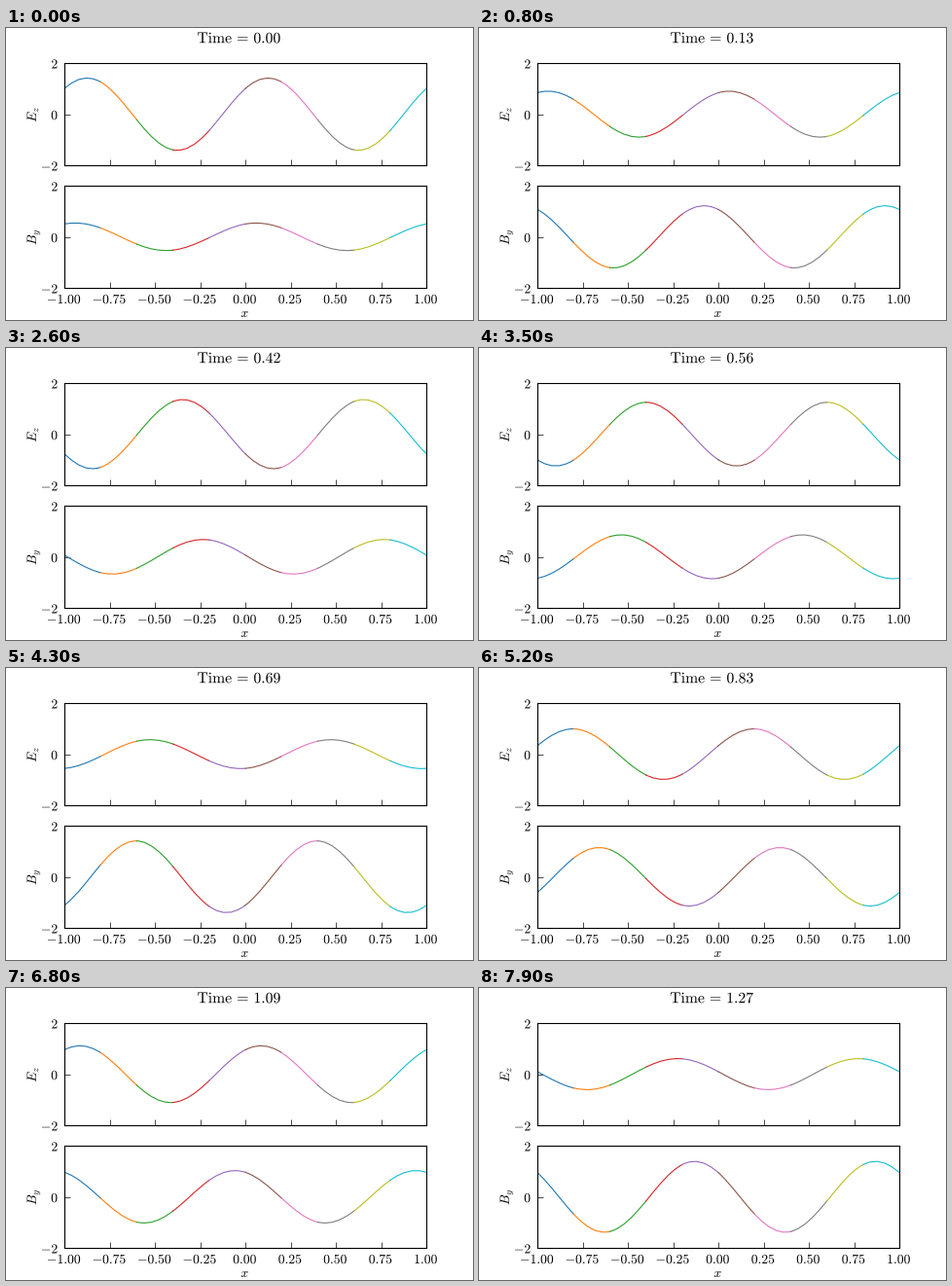
A matplotlib script that plays this animation: 480 px wide and 300 px high, repeating every 8 s.

```python
import numpy as np
import matplotlib.pyplot as plt
from matplotlib import patheffects
from matplotlib.animation import FuncAnimation
from matplotlib.text import Text

plt.rcParams.update({
    "mathtext.fontset": "cm",
    "font.size": 9.8,
    "axes.linewidth": 0.8,
    "lines.linewidth": 0.8,
    "xtick.direction": "in",
    "ytick.direction": "in",
    "xtick.major.size": 4,
    "ytick.major.size": 4,
    "xtick.major.width": 0.5,
    "ytick.major.width": 0.5,
    "xtick.major.pad": 3.6,
    "ytick.major.pad": 4,
})

W, H, DPI = 480, 300, 100
FRAMES, INTERVAL = 80, 100
DT = 0.01603
CELLS, ORDER = 10, 7

# Gauss-Lobatto nodes inside each cell
inner = np.polynomial.legendre.Legendre.basis(ORDER).deriv().roots()
nodes = np.concatenate(([-1], np.sort(inner.real), [1]))
edges = np.linspace(-1, 1, CELLS + 1)
cells = [(a + b) / 2 + (b - a) / 2 * nodes for a, b in zip(edges, edges[1:])]

# Complex amplitudes of the standing mode exp(2*pi*i*x)
E0 = 1 - 1j
B0 = 0.5 - 0.2j


def fields(t):
    c, s = np.cos(2 * np.pi * t), np.sin(2 * np.pi * t)
    return E0 * c + 1j * B0 * s, B0 * c + 1j * E0 * s


def wave(amp, x):
    return (amp * np.exp(2j * np.pi * x)).real


fig, axes = plt.subplots(2, 1, sharex=True, figsize=(W / DPI, H / DPI), dpi=DPI)
fig.subplots_adjust(left=0.125, right=0.9, bottom=0.11, top=0.88, hspace=0.2)
title = fig.suptitle("", fontsize=11.3, y=0.989)

xticks = np.linspace(-1, 1, 9)
for ax, name in zip(axes, ("E_z", "B_y")):
    ax.set_xlim(-1, 1)
    ax.set_ylim(-2, 2)
    ax.set_xticks(xticks, [f"${v:.2f}$" for v in xticks])
    ax.set_yticks([-2, 0, 2], ["$-2$", "$0$", "$2$"])
    box = ax.get_position()
    fig.text(31 / W, (box.y0 + box.y1) / 2, f"${name}$", rotation=90,
             rotation_mode="anchor", ha="center", va="baseline")
fig.text(246 / W, 3 / H, "$x$", ha="center", va="baseline")

lines = [[ax.plot(x, 0 * x, color=f"C{i}")[0] for i, x in enumerate(cells)]
         for ax in axes]

# Draw text as outlines: thin, unhinted strokes
for text in fig.findobj(Text):
    text.set_path_effects([patheffects.Normal()])


def update(n):
    t = n * DT
    title.set_text(rf"$\mathrm{{Time}}\,=\,{t:.2f}$")
    for row, amp in zip(lines, fields(t)):
        for line, x in zip(row, cells):
            line.set_ydata(wave(amp, x))
    return [title, *lines[0], *lines[1]]


anim = FuncAnimation(fig, update, frames=FRAMES, interval=INTERVAL,
                     repeat=True, repeat_delay=0, blit=False)
plt.show()
```
